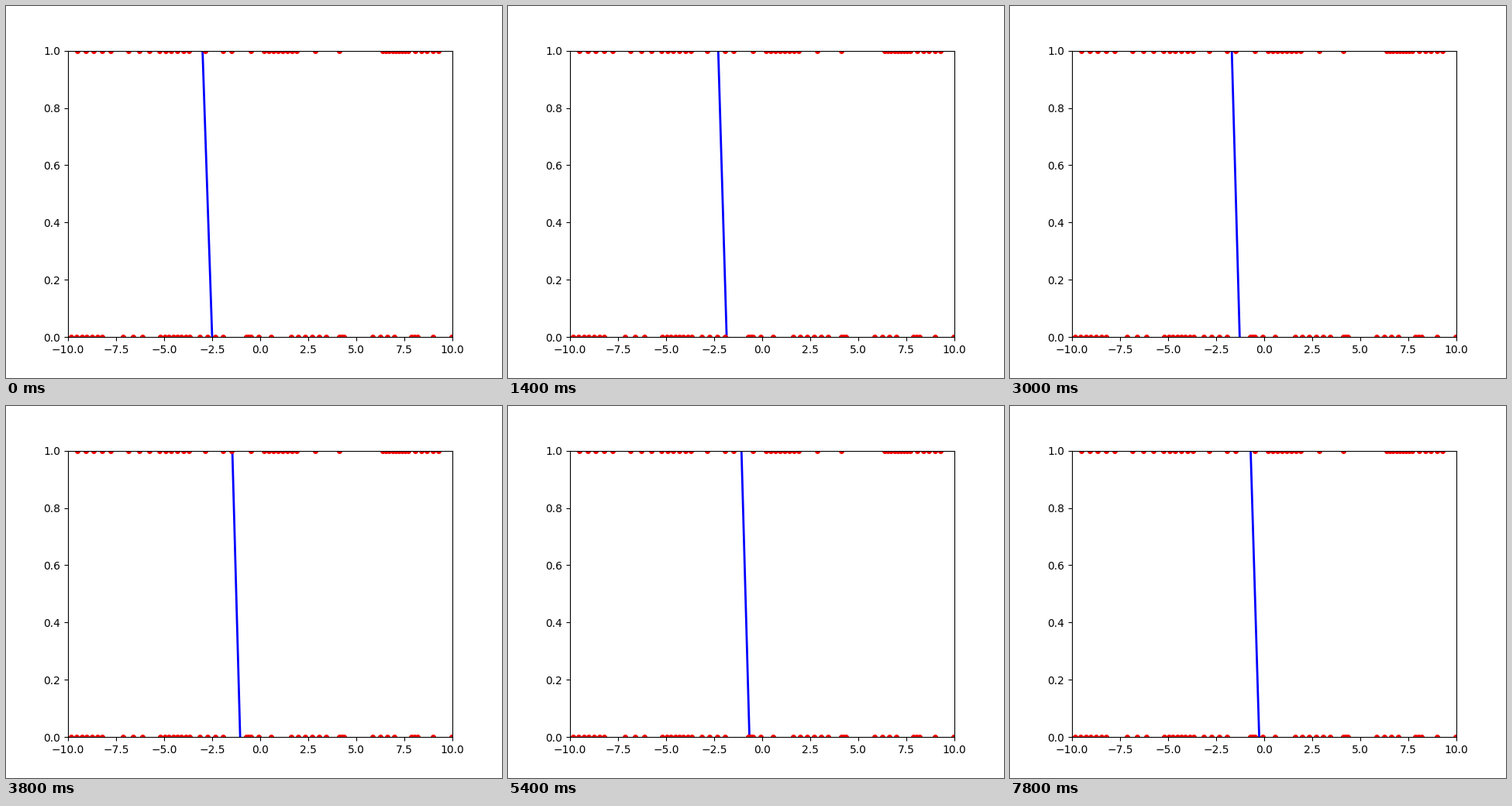
A matplotlib script that plays this animation: 640 px wide and 480 px high, repeating every 8000 ms.

```python
import numpy as np
import matplotlib.pyplot as plt
from matplotlib.animation import FuncAnimation

FRAMES = 40
INTERVAL = 200

# Clusters of samples along the x axis: first, last, count
UPPER = [(-9.5, -7.8, 5), (-6.84, -5.75, 3), (-5.23, -3.7, 6),
         (-2.85, -1.92, 2), (-1.5, -0.47, 2), (0.21, 1.9, 8),
         (2.87, 4.12, 2), (6.38, 7.71, 9), (8.07, 9.28, 5)]
LOWER = [(-9.83, -8.21, 7), (-7.13, -6.12, 3), (-5.19, -3.66, 8),
         (-3.13, -1.92, 4), (-0.71, -0.47, 3), (-0.07, 0.58, 2),
         (1.62, 3.44, 6), (4.12, 4.37, 3), (5.86, 6.99, 4),
         (7.88, 8.2, 3), (9.0, 9.97, 2)]


def settle(start, end, keep, n):
    """Exponential approach; `keep` is the share of distance left after 6 steps."""
    return end + (start - end) * keep ** (n / 6)


fig, ax = plt.subplots(figsize=(6.4, 4.8), dpi=100)
ax.set_xlim(-10, 10)
ax.set_ylim(0, 1)

line, = ax.plot([], [], color="blue", lw=2)
for level, clusters in ((1, UPPER), (0, LOWER)):
    xs = np.concatenate([np.linspace(*c) for c in clusters])
    ax.plot(xs, np.full(len(xs), level), "o", color="red", ms=4)


def update(n):
    top = settle(-3.0, -0.105, 0.785, n)
    bottom = settle(-2.5, 0.524, 0.8125, n)
    y = np.array([-0.5, 1.5])
    line.set_data(bottom + (top - bottom) * y, y)
    return line,


anim = FuncAnimation(fig, update, frames=FRAMES, interval=INTERVAL,
                     repeat=True, repeat_delay=0)
plt.show()
```
